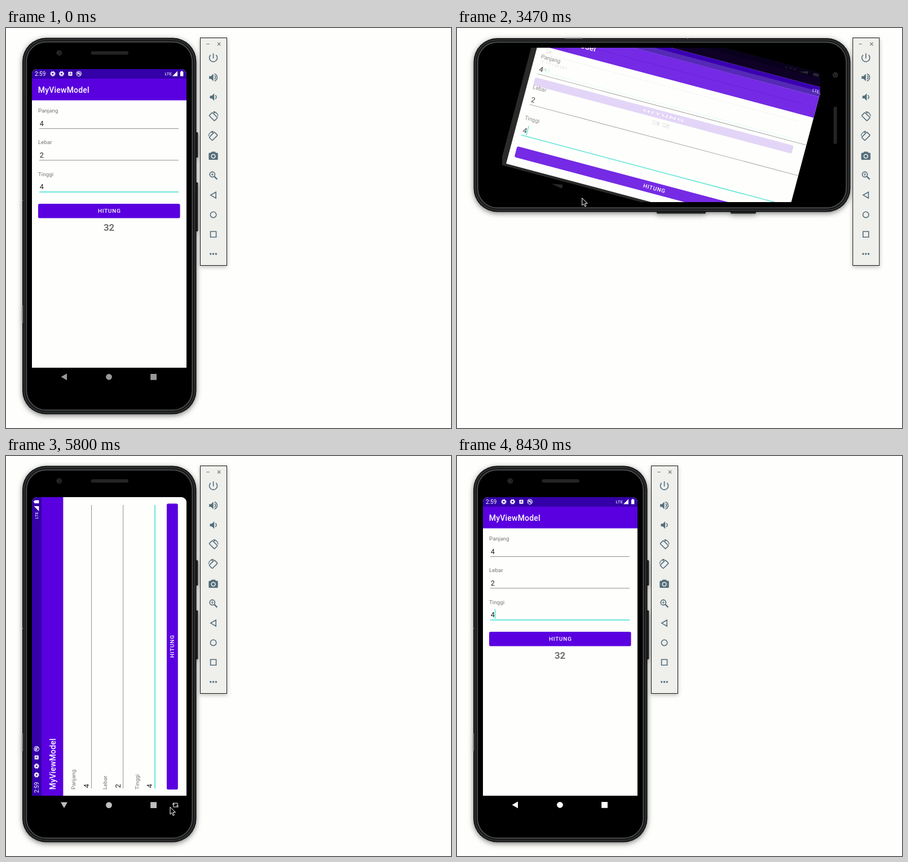
These frames come from a looping animation (789x710 px, 8.51 s). An HTML page:

```html
<!DOCTYPE html>
<html lang="id">
<head>
<meta charset="utf-8">
<title>MyViewModel</title>
<style>
  html, body { margin: 0; width: 100%; height: 100%; overflow: hidden; background: #fefffc; }
  svg { display: block; width: 789px; height: 710px; }
  text { font-family: Roboto, "Open Sans", sans-serif; }
  .line { fill: none; stroke: #546e7a; stroke-width: 1.6; }
  .solid { fill: #546e7a; }
</style>
</head>
<body>
<svg id="stage" viewBox="0 0 789 710" xmlns="http://www.w3.org/2000/svg"></svg>
<script>
const LOOP = 8510, PAPER = '#fefffc', PURPLE = '#5a00e0', TEAL = '#40dfd0';
const TURN = 400;
const TO_LAND = 1170, LAND_TURN = 3350, GLITCH = 4670, TO_PORT = 4700, PORT_TURN = 6629;

const rect = (x, y, w, h, fill, extra = '') =>
  `<rect x="${x}" y="${y}" width="${w}" height="${h}" fill="${fill}" ${extra}/>`;
const label = (x, y, size, fill, str, extra = '') =>
  `<text x="${x}" y="${y}" font-size="${size}" fill="${fill}" ${extra}>${str}</text>`;
const at = (x, y, body) => `<g transform="translate(${x} ${y})">${body}</g>`;

const gear = `<g fill="none" stroke="#fff"><circle r="2.5" stroke-width="1.8"/>
  <circle r="3.9" stroke-width="1.5" stroke-dasharray="1.8 1.263"/></g>`;
const ring = `<g fill="none" stroke="#fff" stroke-width="1.1"><circle r="4.2"/>
  <path d="M-3-3L3 3M-2 1.5V0A2 2 0 0 1 2 0V1"/></g>`;

function statusBar(w) {
  return rect(0, 0, w, 17.2, '#3400a8')
    + label(5, 12, 10, '#fff', '2:59')
    + at(37, 8.2, gear) + at(52.5, 8.2, gear)
    + rect(64.5, 4.7, 7, 7, '#fff', 'rx=".6"') + label(66.2, 10.4, 5.5, '#3400a8', 'A', 'font-weight="700"')
    + at(83.2, 8.2, ring)
    + label(w - 38.5, 11.2, 8, '#fff', 'LTE')
    + `<path d="M${w - 16} 3.6V12.4H${w - 25}z" fill="#fff"/>`
    + `<path d="M${w - 11} 4.4h1.5v-1.2h2.4v1.2h1.5v8h-5.4z" fill="#fff"/>`;
}

function field(i, w, name, value) {
  const focused = i === 2;
  return at(0, 56.2 * i,
    label(11, 77.2, 9.8, '#757575', name)
    + label(13.7, 100.6, 12.6, '#222', value)
    + rect(13, focused ? 104.9 : 105.1, w - 27, focused ? 1.5 : 0.9, focused ? TEAL : '#858585')
    + (focused ? rect(20.8, 86.6, 1.4, 17, TEAL, 'class="caret"') : ''));
}

function content(w, h, land) {
  const btnH = land ? 19.8 : 25.6;
  return rect(0, 0, w, h, PAPER) + statusBar(w)
    + rect(0, 17, w, 38.4, PURPLE)
    + label(10.8, 41.6, 14, '#fff', 'MyViewModel', 'font-weight="500" letter-spacing=".2"')
    + field(0, w, 'Panjang', 4) + field(1, w, 'Lebar', 2) + field(2, w, 'Tinggi', 4)
    + rect(11, 239, w - 22.4, btnH, PURPLE, 'rx="2.8"')
    + label(w / 2 + .3, 239 + btnH / 2 + 3.5, 9.8, '#fff', 'HITUNG',
        'text-anchor="middle" font-weight="500" letter-spacing=".87"')
    + (land ? '' : label(w / 2 - .4, 286.6, 16.8, '#737373', '32', 'text-anchor="middle" font-weight="700"'));
}

// The navigation bar lies below the content, or to its left in landscape.
function display(id, land) {
  const [w, h] = land ? [564, 274] : [274, 564];
  const key = (n, body) => land ? at(17.4, n, body) : at(n, 546.3, body);
  return `<g id="${id}">` + rect(0, 0, w, h, '#000')
    + at(land ? 34 : 0, 0, content(land ? 530 : 274, land ? 274 : 530, land))
    + '<g class="nav">'
    + key(57, '<path d="M-5.4 0L5-6V6z"/>') + key(136.5, '<circle r="5.4"/>')
    + key(215.6, '<path d="M-5.4-5.4H5.4V5.4H-5.4z"/>') + '</g>'
    + '<g class="hint" fill="none" stroke="#fff" stroke-width="1">'
    + key(254.5, '<path d="M-3.4 5V-3.6H2M.6-5.6L2.6-3.6.6-1.6M3.4-5V3.6H-2M-.6 1.6L-2.6 3.6-.6 5.6"/>') + '</g></g>';
}

function phone() {
  const frame = (d, fill, extra = '') =>
    rect(29 + d, 17.5 + d, 308.5 - 2 * d, 668 - 2 * d, fill, `rx="${42 - d}" ${extra}`);
  return rect(335, 185, 5.5, 45, '#222425', 'rx="1.5"') + rect(335, 274, 5.5, 87, '#222425', 'rx="1.5"')
    + frame(0, '#0b0b0b') + frame(1.5, '#2c2e2f') + frame(4.2, '#161717')
    + frame(7.2, 'none', 'stroke="#5a5d5f" stroke-width="1.3"') + frame(8.4, '#000')
    + rect(28.5, 305, 1.5, 2, '#888') + rect(28.5, 492, 1.5, 32, '#777')
    + rect(150.5, 41.3, 66.5, 6, '#242424', 'rx="3"')
    + '<circle cx="94.3" cy="44.2" r="4.8" fill="#2a2a2a"/><circle cx="94.3" cy="44.2" r="2.6" fill="#111"/>'
    + '<circle cx="93.8" cy="44" r="1" fill="#555"/>';
}

const tilt = `<g class="line"><rect x="-4" y="-6.6" width="8" height="13.2" rx="1" transform="rotate(-45)"/>
  <path d="M.5-8.6A8.6 8.6 0 0 1 8.4-.6M3.2-8.8L.5-8.6 2.6-6" stroke-width="1.4"/></g>`;
const tools = [
  '<path class="line" stroke-width="2" d="M0-8V1M-4.8-5.2A7 7 0 1 0 4.8-5.2"/>',
  '<path class="solid" d="M-7.5-2.4h3.4L0-6.6V6.6L-4.1 2.4H-7.5z"/><path class="line" d="M2-3.2A3.6 3.6 0 0 1 2 3.2M2-6.4A6.7 6.7 0 0 1 2 6.4"/>',
  '<path class="solid" d="M-6-2.4h3.4L1.6-6.6V6.6L-2.6 2.4H-6z"/><path class="line" d="M3.4-3.2A3.6 3.6 0 0 1 3.4 3.2"/>',
  tilt,
  `<g transform="scale(-1 1)">${tilt}</g>`,
  '<path class="solid" d="M-3-7.5H3L4.5-5.6H6.6A1.6 1.6 0 0 1 8.2-4V5.4A1.6 1.6 0 0 1 6.6 7H-6.6A1.6 1.6 0 0 1-8.2 5.4V-4A1.6 1.6 0 0 1-6.6-5.6H-4.5z"/><circle cy=".6" r="4.2" fill="#efefec"/><circle class="solid" cy=".6" r="2.6"/>',
  '<g class="line"><circle cx="-1.8" cy="-1.8" r="4.6"/><path d="M1.8 1.8L6.8 6.8" stroke-width="2.2"/><path d="M-4.1-1.8H.5M-1.8-4.1V.5" stroke-width="1.1"/></g>',
  '<path class="line" d="M4.6-5.4L-4.8 0 4.6 5.4z"/>',
  '<circle class="line" r="5.2"/>',
  '<path class="line" d="M-5-5H5V5H-5z"/>',
  '<g class="solid"><circle cx="-4.8" r="1.7"/><circle r="1.7"/><circle cx="4.8" r="1.7"/></g>'
];

function toolbar() {
  return rect(344.5, 17.5, 47, 404, '#efefec', 'stroke="#151515" filter="url(#faint)"')
    + '<path d="M355.3 28.5h5.4M375 25.6l5.4 5.4M380.4 25.6l-5.4 5.4" stroke="#6d7478" stroke-width="1.1"/>'
    + tools.map((icon, i) => at(367.6, 53 + 34.8 * i, icon)).join('');
}

const clip = (id, x, y, w, h, r = 0) => `<clipPath id="${id}">${rect(x, y, w, h, '#000', `rx="${r}"`)}</clipPath>`;
const shadow = (id, blur, opacity) =>
  `<filter id="${id}" x="-15%" y="-15%" width="130%" height="130%" color-interpolation-filters="sRGB">
    <feDropShadow dx="0" dy="2.5" stdDeviation="${blur}" flood-color="#000" flood-opacity="${opacity}"/></filter>`;
const stage = document.getElementById('stage');
stage.innerHTML = `<defs>
    ${shadow('soft', 5, .5)}${shadow('faint', 3.5, .25)}
    ${clip('portClip', 46, 73, 274, 564, 9)}${clip('landClip', 80, 35, 564, 274, 9)}
    ${clip('cornerClip', 46, 73, 274, 254)}${clip('newClip', 0, 0, 564, 564)}
    ${display('port', false)}${display('land', true)}
  </defs>`
  + rect(0, 0, 789, 710, PAPER)
  + `<g filter="url(#soft)"><g id="phone">${phone()}</g></g>
  <g id="screen"><use id="fresh" clip-path="url(#newClip)"/><use id="stale"/></g>
  <g id="glitch" clip-path="url(#cornerClip)"><use href="#land" x="46" y="73"/></g>
  <g id="toolbar">${toolbar()}</g>
  <path id="mouse" d="M0 0V13l3-2.8 2.1 4.9 2.2-.9-2.1-4.8h4.3z" fill="#0a0a0a" stroke="#fff" stroke-width="1"/>`;

const $ = id => document.getElementById(id);
const set = (el, attrs) => { for (const k in attrs) el.setAttribute(k, attrs[k]); };
const show = (el, on) => set(el, { display: on ? 'inline' : 'none' });
const clamp = v => Math.max(0, Math.min(1, v));
const mix = (a, b, p) => a + (b - a) * p;
const within = (t, spans) => spans.some(([a, b]) => t >= a && t < b);

const mousePath = [
  [70, 369, 81], [350, 366, 130], [730, 361, 188], [1500, 361, 188], [1570, 369, 187], [1900, 190, 225],
  [2330, 96, 280], [2700, 93, 287], [2930, 131, 299], [3070, 183, 300], [3370, 215, 302], [3470, 221, 302],
  [3800, 470, 250], [4170, 706, 165], [4370, 719, 153], [4900, 719, 153], [4970, 644, 191], [5250, 440, 410],
  [5500, 240, 590], [5680, 280, 641], [5800, 291, 623], [5900, 291, 623], [6100, 297, 617], [6470, 298, 618],
  [7440, 298, 618], [7700, 210, 410], [8040, 38, 3]
];
const caretOff = [[0, 70], [570, 1070], [1600, 2100], [3850, 6600], [7470, 7970]];

function mouseAt(t) {
  const i = mousePath.findIndex(k => k[0] > t);
  if (i < 1) return null;
  const [a, b] = [mousePath[i - 1], mousePath[i]];
  const p = (t - a[0]) / (b[0] - a[0]);
  return [mix(a[1], b[1], p), mix(a[2], b[2], p)];
}

function navLevel(t) {
  if (t < TO_PORT) return mix(153, 255, clamp((t - 2430) / 400));
  return mix(190, 255, clamp((t - 5900) / 200));
}

function place(use, id, centre, angle, sx = 1, sy = 1) {
  const [w, h] = id === 'land' ? [564, 274] : [274, 564];
  set(use, {
    href: '#' + id,
    transform: `translate(${centre}) rotate(${angle}) scale(${sx} ${sy}) translate(${-w / 2} ${-h / 2})`
  });
}

// The old screen turns with the new one, stretching to its shape as it fades.
function drawScreen(t, sideways) {
  const centre = sideways ? '362 172' : '183 355';
  const next = sideways ? 'land' : 'port', prev = sideways ? 'port' : 'land';
  const settled = t < TO_LAND;
  const time = settled ? 1 : clamp((t - (sideways ? LAND_TURN : PORT_TURN)) / TURN);
  const p = 1 - (1 - time) ** 5;
  const angle = (sideways ? 90 : -90) * (1 - p);
  const [w0, h0, w1, h1] = sideways ? [274, 564, 564, 274] : [564, 274, 274, 564];
  const w = mix(w0, w1, p), h = mix(h0, h1, p);
  place($('fresh'), next, centre, angle);
  place($('stale'), prev, centre, angle, w / w0, h / h0);
  set($('stale'), { opacity: 1 - p });
  show($('stale'), p < 1);
  set($('newClip').firstChild, { x: (w1 - w) / 2, y: (h1 - h) / 2, width: w, height: h });
  set($('screen'), { 'clip-path': `url(#${next}Clip)` });
}

function render(t) {
  const sideways = t >= TO_LAND && t < TO_PORT;
  set($('phone'), { transform: sideways ? 'matrix(0 1 -1 0 715 -11)' : '' });
  set($('toolbar'), { transform: `translate(${sideways ? 357.3 : 0} 0)` });
  drawScreen(t, sideways);
  show($('glitch'), t >= GLITCH && t < TO_PORT);

  const level = Math.round(navLevel(t));
  const caret = !within(t, caretOff);
  const hint = t < LAND_TURN ? clamp((t - 1510) / 400) : t < PORT_TURN ? clamp((t - 5400) / 300) : 0;
  stage.querySelectorAll('.nav').forEach(el => set(el, { fill: `rgb(${level},${level},${level})` }));
  stage.querySelectorAll('.caret').forEach(el => show(el, caret));
  stage.querySelectorAll('.hint').forEach(el => set(el, { opacity: hint }));

  const mouse = mouseAt(t);
  show($('mouse'), mouse);
  if (mouse) set($('mouse'), { transform: `translate(${mouse})` });
}

const start = performance.now();
function tick() {
  render((performance.now() - start) % LOOP);
  requestAnimationFrame(tick);
}
tick();
</script>
</body>
</html>
```
